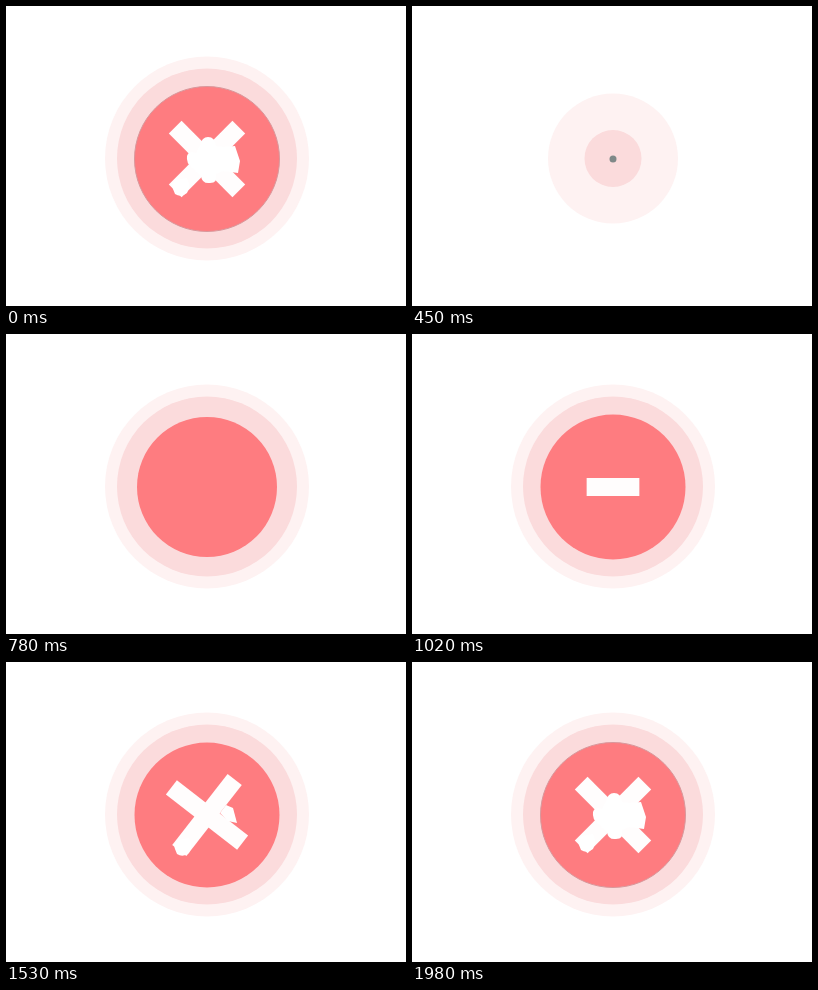
Animation, 400 px wide and 300 px high, one loop 2040 ms. Source, as an HTML page:

```html
<!DOCTYPE html>
<html lang="en">
<head>
<meta charset="utf-8">
<title>Error badge</title>
<style>
  html, body { margin: 0; width: 100%; height: 100%; overflow: hidden; background: #fff; }
  svg { display: block; width: 100%; height: 100%; }
</style>
</head>
<body>
<svg viewBox="0 0 400 300">
  <circle id="halo" cx="201" cy="152.5" fill="#fef2f2"/>
  <circle id="ring" cx="201" cy="152.5" fill="#fbdbdc"/>
  <circle id="disc" cx="201" cy="153"/>
  <rect id="barB" x="-45" y="-9" width="90" height="18"/>
  <rect id="barA" x="-45" y="-9" width="90" height="18" fill="#fffdfd"/>
  <g fill="#fff">
    <path id="foot" d="M167 183Q165 178 170 174L181 172Q185 180 181 187Q175 192 169 188Z"/>
    <path id="wedge" d="M214 151L220 143L227 146L231 161L222 159Z"/>
    <path id="core" d="M194 139Q196 131 202 131Q209 131 210 140L217 141L229 140L234 155L232 167L217 165L210 168Q212 177 204 177Q196 178 195 170L186 162Q180 157 181 150Q183 144 190 147Z"/>
  </g>
</svg>
<script>
const LOOP = 2040, STEP = 30, HOLD = 90;
const part = Object.fromEntries(
  [...document.querySelectorAll("[id]")].map(el => [el.id, el]));

// Smooth curve through [time, value] keys, flat at both ends and at turning points.
function track(...keys) {
  const rate = i => (keys[i + 1][1] - keys[i][1]) / (keys[i + 1][0] - keys[i][0]);
  const slope = keys.map((_, i) => {
    if (i === 0 || i === keys.length - 1) return 0;
    const a = rate(i - 1), b = rate(i);
    return a * b > 0 ? 2 * a * b / (a + b) : 0;
  });
  return t => {
    if (t <= keys[0][0]) return keys[0][1];
    const i = keys.findIndex(k => k[0] > t) - 1;
    if (i < 0) return keys[keys.length - 1][1];
    const [t0, v0] = keys[i], [t1, v1] = keys[i + 1];
    const d = t1 - t0, u = (t - t0) / d, w = 1 - u;
    return v0 * (1 + 2 * u) * w * w + v1 * u * u * (3 - 2 * u)
      + d * u * w * (slope[i] * w - slope[i + 1] * u);
  };
}

const haloR = track([195, 0], [450, 65], [570, 97.5], [645, 102]);
const ringR = track([310, 0], [450, 28.5], [570, 73], [690, 90]);
const discR = track([400, 0], [450, 3.5], [570, 31.5], [780, 70], [870, 72.5]);
const grow = track([870, 0], [1140, 1]);
const angleA = track([1200, 0], [1260, -14.5], [1440, -49], [1530, -52], [1710, -45]);
const angleB = track([1230, 0], [1260, 1], [1530, 37.7], [1710, 45]);
const redness = track([585, 0], [690, 1]);
const whiteness = track([1260, 0], [1380, 1]);

const mix = (a, b, u) => `rgb(${a.map((v, i) => Math.round(v + (b[i] - v) * u))})`;
const show = (el, on) => el.setAttribute("visibility", on ? "visible" : "hidden");

function placeBar(el, angle, scale) {
  show(el, scale > 0);
  el.setAttribute("transform", `translate(201 153) rotate(${angle}) scale(${scale} 1)`);
}

function draw(time) {
  let t = Math.floor((time % LOOP) / STEP) * STEP;
  if (t < HOLD) t = LOOP;
  part.halo.setAttribute("r", haloR(t));
  part.ring.setAttribute("r", ringR(t));
  part.disc.setAttribute("r", discR(t));
  part.disc.setAttribute("fill", t < 480 ? "#7f8888"
    : mix([255, 255, 255], [254, 124, 128], redness(t)));
  part.disc.setAttribute("stroke", t >= 1710 ? "#d9989c" : "none");
  part.barB.setAttribute("fill", mix([236, 218, 220], [255, 253, 253], whiteness(t)));
  placeBar(part.barA, angleA(t), grow(t));
  placeBar(part.barB, angleB(t), grow(t));

  show(part.foot, t >= 1470);
  part.foot.setAttribute("transform", t < 1710 ? "translate(2 4)" : "");
  show(part.wedge, t >= 1470 && t < 1710);
  show(part.core, t >= 1710);
}

const start = performance.now();
function tick() {
  draw(performance.now() - start);
  requestAnimationFrame(tick);
}
tick();
</script>
</body>
</html>
```
